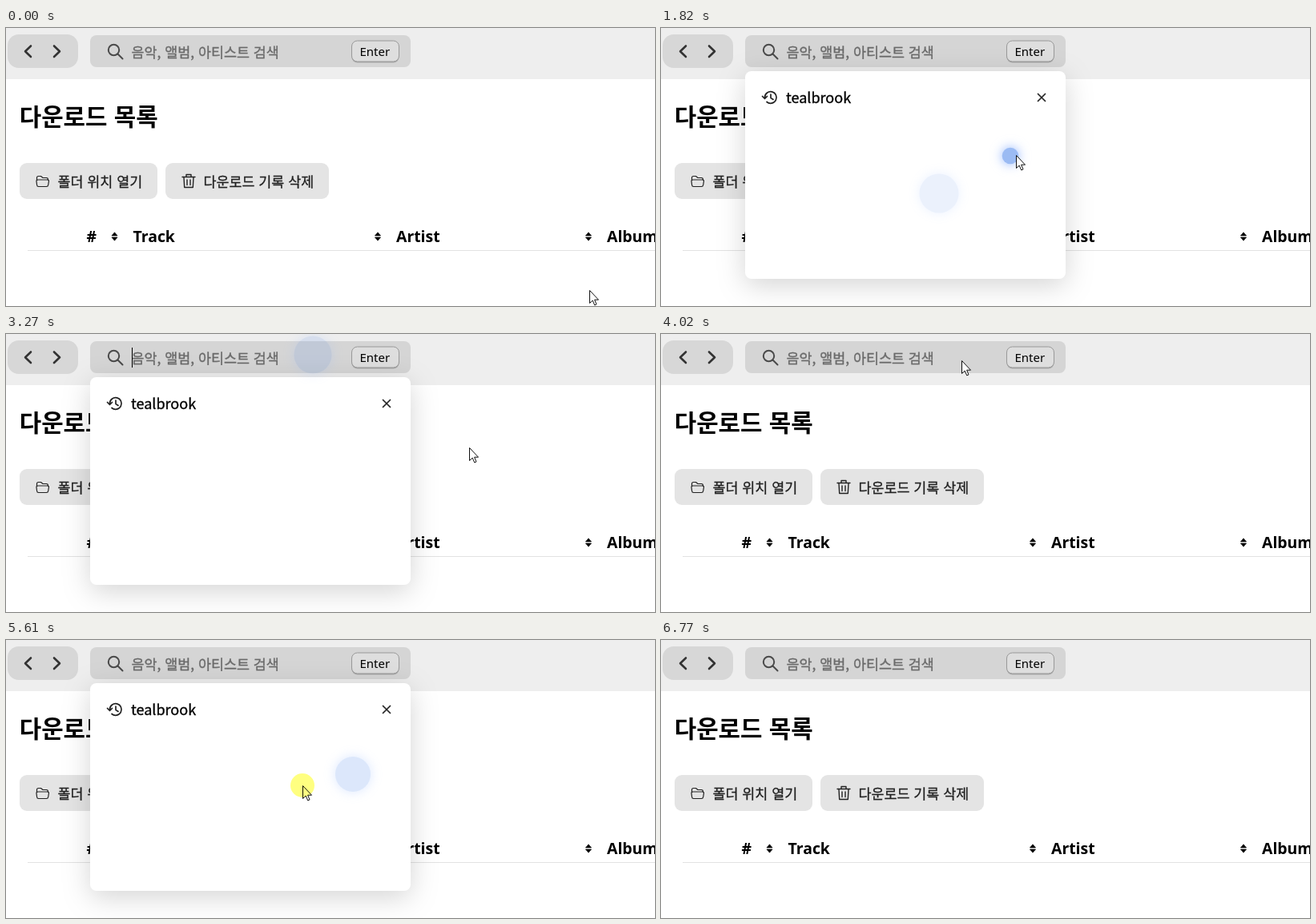
Write an HTML page that moves like this. It is 810 px wide and 348 px high and loops after 6950 ms.

```html
<!DOCTYPE html>
<html lang="ko">
<head>
<meta charset="utf-8">
<style>
  html, body { margin: 0; width: 100%; height: 100%; overflow: hidden; background: #fff; }
  svg { display: block; width: 810px; height: 348px; }
  text { font-family: "Noto Sans CJK KR", "Noto Sans CJK", "Noto Sans CJK JP", sans-serif; font-size: 17.4px; }
  .latin text, .key { font-family: "Noto Sans", sans-serif; }
  .latin text { font-size: 19.4px; font-weight: 600; }
  .label { font-weight: 500; fill: #222; stroke: #222; stroke-width: .3px; }
  .line { fill: none; stroke: #222; stroke-width: 1.4; stroke-linecap: round; stroke-linejoin: round; }
  #panel rect { filter: drop-shadow(0 8px 17px rgba(0, 0, 0, .17)); }
  .ripple { fill: #4380ea; filter: drop-shadow(0 0 4px #8fb4ff) drop-shadow(0 0 7px #8fb4ff); }
  #press { fill: #ffff80; mix-blend-mode: multiply; }
</style>
</head>
<body>
<svg viewBox="0 0 810 348">
  <defs>
    <path id="sort" d="M0-5.2L3.6-1H-3.6ZM0 5.2L3.6 1H-3.6Z" stroke="#000" stroke-width=".6" stroke-linejoin="round"/>
  </defs>

  <rect width="810" height="64" fill="#eee"/>
  <rect x="2" y="8" width="88" height="42" rx="14" fill="#d7d7d7"/>
  <path class="line" d="M31 22.5L24 29.2L31 36M60 22.5L67 29.2L60 36" style="stroke:#333;stroke-width:2.6"/>
  <rect x="105" y="9" width="400" height="40" rx="8" fill="#d5d5d5"/>
  <g class="line" style="stroke:#4a4a4a;stroke-width:2"><circle cx="134.5" cy="27.5" r="6.7"/><path d="M139.5 32.5L145.5 38.5"/></g>
  <text x="156.5" y="36.5" fill="#6a6a6a" stroke="#6a6a6a" stroke-width=".35">음악, 앨범, 아티스트 검색</text>
  <rect x="431.5" y="17.5" width="59" height="26" rx="7" fill="#aaa"/>
  <rect x="431.5" y="16" width="59" height="26" rx="7" fill="#dedede" stroke="#999"/>
  <text class="key" x="441.5" y="35" style="font-size:15px">Enter</text>
  <path id="caret" d="M157.5 17V42" stroke="#000"/>

  <text x="16.8" y="121.5" style="font-size:29.8px;font-weight:700">다운로드 목록</text>
  <rect x="17" y="169" width="172" height="45" rx="9" fill="#e4e4e4"/>
  <rect x="199" y="169" width="204" height="45" rx="9" fill="#e4e4e4"/>
  <path class="line" d="M38.5 190V187.5Q38.5 185.5 40.5 185.5H43.5L46 187.5H50.5Q52.5 187.5 52.5 190M40 190H51.5Q53.7 190 53.4 192L52.7 196.5Q52.4 198.5 50.5 198.5H40.5Q38.8 198.5 38.6 196.5L38 192Q37.8 190 40 190Z" style="stroke-width:1.2"/>
  <path class="line" d="M220 186.5H236M225 186V183.5H231V186M222 187L222.7 199.5H233.3L234 187M226 190V196.5M230 190V196.5"/>
  <text class="label" x="64.5" y="198.5">폴더 위치 열기</text>
  <text class="label" x="246.5" y="198.5">다운로드 기록 삭제</text>

  <g class="latin">
    <text x="100.5" y="268">#</text>
    <text x="158.5" y="268">Track</text>
    <text x="487" y="268">Artist</text>
    <text x="750" y="268">Album</text>
  </g>
  <use href="#sort" x="135.5" y="261"/><use href="#sort" x="464" y="261"/><use href="#sort" x="727" y="261"/>
  <path d="M27 278.5H810" stroke="#e2e2e2"/>

  <g id="panel">
    <rect x="105" y="54" width="400" height="260" rx="8" fill="#fff"/>
    <path class="line" d="M129.5 87A7.3 7.3 0 1 1 132 92.5M126.5 85.5L129.5 88.5L132.5 85.5M137 83V87.5L140 89.5" style="stroke-width:1.7"/>
    <text x="156" y="94" style="font-size:18px;font-weight:500" stroke="#000" stroke-width=".35">tealbrook</text>
    <path class="line" d="M470.5 82.5L479.5 91.5M479.5 82.5L470.5 91.5" style="stroke-width:1.7"/>
  </g>

  <g id="ripples"></g>
  <path id="cursor" d="M.5.5V16.5L4.2 13.1L6.7 18.9L9 17.9L6.6 12.2H11.5Z" fill="#fff" stroke="#111"/>
  <circle id="press" r="15"/>
</svg>
<script>
const LOOP = 6950, HOLD = 140, TRAVEL = 370, FADE = 200, RIPPLE = 400, BLINK = 500;
const $ = id => document.getElementById(id);
const clamp = v => Math.max(0, Math.min(1, v));
const ease = p => p * p * (3 - 2 * p);

// Each click: release time and place; the button goes down HOLD earlier
const clicks = [
  [540, 365, 32], [960, 345, 164], [1490, 347, 207], [1775, 436, 160], [2240, 570, 150],
  [2960, 383, 26], [3580, 592, 150],
  [4280, 375, 33], [4780, 368, 195], [5050, 318, 195], [5330, 433, 168], [5660, 370, 182], [6320, 587, 145]
].map(([up, x, y]) => ({
  down: up - HOLD, up, x, y,
  opens: y < 50,
  closes: x > 505
}));
const path = [{ up: 0, x: 728, y: 328 }, ...clicks, { down: LOOP, x: 768, y: 352 }];

// After each release the pointer glides to the next place and waits there
function pointer(t) {
  const i = path.findLastIndex(c => c.up <= t);
  const a = path[i], b = path[i + 1];
  const p = ease(clamp((t - a.up) / Math.min(TRAVEL, b.down - a.up)));
  return [a.x + (b.x - a.x) * p, a.y + (b.y - a.y) * p];
}

const place = (el, [x, y]) => el.setAttribute("transform", `translate(${x} ${y})`);
const show = (el, on) => el.style.display = on ? "" : "none";

for (const c of clicks) {
  c.ripple = document.createElementNS("http://www.w3.org/2000/svg", "circle");
  c.ripple.setAttribute("class", "ripple");
  place(c.ripple, [c.x, c.y]);
  $("ripples").append(c.ripple);
}

function draw(t) {
  const at = pointer(t);
  place($("cursor"), at.map(Math.round));
  place($("press"), at);

  for (const { up, ripple } of clicks) {
    const p = (t - up) / RIPPLE;
    show(ripple, p >= 0 && p < 1);
    ripple.setAttribute("r", 8 + 20 * clamp(p));
    ripple.style.opacity = .6 * (1 - clamp(p));
  }

  const past = clicks.filter(c => c.down <= t);
  const last = past.at(-1);
  show($("press"), last && t < last.up);
  show($("caret"), last?.opens && (t - last.down) % (2 * BLINK) < BLINK);

  const toggle = past.findLast(c => c.opens || c.closes);
  const fade = toggle ? clamp((t - toggle.down) / FADE) : 0;
  $("panel").style.opacity = toggle?.closes ? 1 - fade : fade;
}

const start = performance.now();
function tick() {
  draw((performance.now() - start) % LOOP);
  requestAnimationFrame(tick);
}
tick();
</script>
</body>
</html>
```
